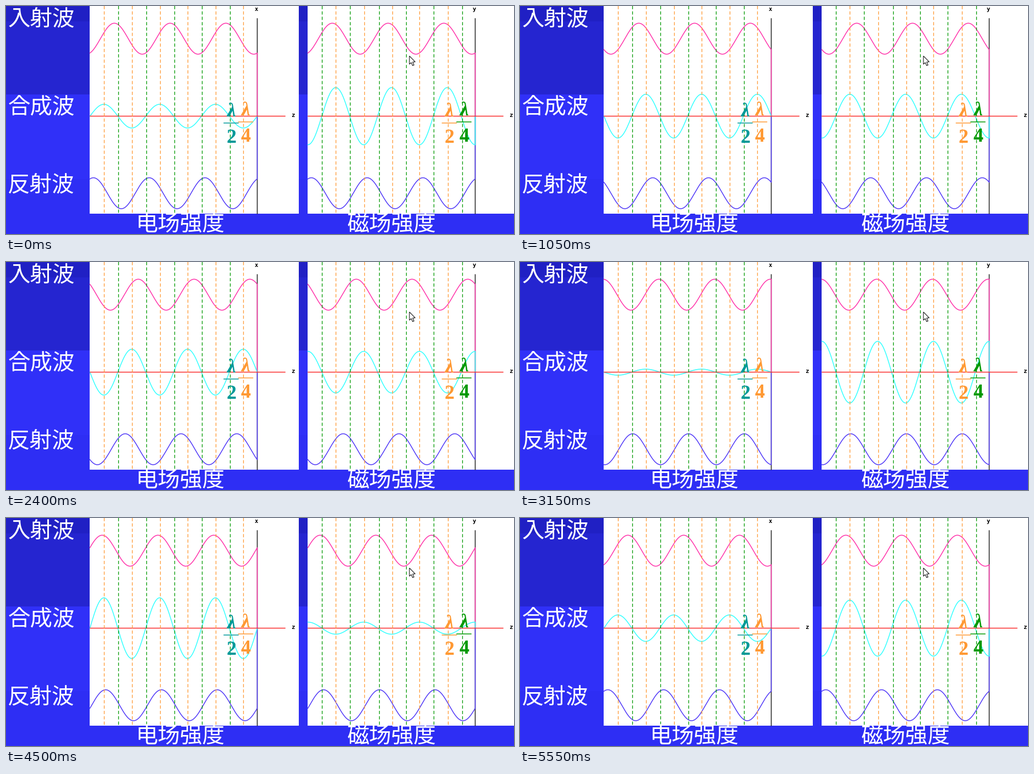
Recreate the animation shown at these times as a matplotlib script. Size 923 by 415 pixels, loop 5.85 s.

```python
import numpy as np
import matplotlib.pyplot as plt
from matplotlib.animation import FuncAnimation
from matplotlib.patches import Polygon, Rectangle

W, H, DPI = 923, 415, 64
PX = 72 / DPI                      # one pixel in points
TICK, TICKS = 150, 39

PINK, CYAN, VIOLET, RED = "#ff33aa", "#33ffff", "#5038f8", "#fa2a2a"
ORANGE, GREEN, TEAL = "#ff9933", "#009900", "#009999"

SPAN = 304                         # three wavelengths
K = 2 * np.pi * 3 / SPAN
AMP = 28.2
TOP, MID, LOW = 59.5, 200.5, 340.8
STEP = 2 * np.pi / 128             # smallest phase advance

fig = plt.figure(figsize=(W / DPI, H / DPI), dpi=DPI)
ax = fig.add_axes([0, 0, 1, 1])
ax.set_xlim(0, W)
ax.set_ylim(H, 0)
ax.axis("off")


def rect(x, y, w, h, color):
    ax.add_patch(Rectangle((x, y), w, h, color=color, lw=0, zorder=0))


def line(xs, ys, color, width, z, **kw):
    return ax.plot(xs, ys, color=color, lw=width * PX, zorder=z,
                   snap=False, **kw)[0]


def text(x, y, s, size, color, font, **kw):
    return ax.text(x, y, s, size=size * PX, color=color, family=font,
                   ha="center", va="baseline", zorder=8, **kw)


def caption(x, y, s):
    text(x, y, s, 40.5, "white", "Noto Sans CJK JP")


def axis_label(x, y, s):
    text(x, y, s, 10.5, "black", "DejaVu Sans Mono", weight="bold")


def fraction(x, y, digit, color):
    text(x, y - 12, "λ", 36, color, "Liberation Serif",
         style="italic", weight="bold")
    line([x - 13, x + 13], [y, y], color, 1.5, 7)
    text(x, y + 36, digit, 36, color, "Liberation Serif", weight="bold")


def dashes(xs, color):
    for x in xs:
        line([x + 0.5] * 2, [0, 378], color, 1.3, 5,
             dashes=(4.5, 3), dash_capstyle="butt")


class Panel:
    def __init__(self, left, sign, axis_name):
        self.sign = sign
        self.u = np.linspace(0, SPAN, 153)
        self.x = left - 0.5 + self.u
        end = self.x[-1]
        line([end, end], [23, 378], "#202020", 1.5, 1)
        line([left, left + 354], [MID, MID], RED, 1.5, 4)
        axis_label(end - 1.5, 9, axis_name)
        axis_label(left + 368.5, 202, "z")
        self.incident = line([], [], PINK, 1.5, 2)
        self.reflected = line([], [], VIOLET, 1.5, 2)
        self.total = line([], [], CYAN, 1.5, 3)

    def show(self, curve, base, wave):
        # every curve ends with a drop to the horizontal axis
        curve.set_data(np.append(self.x, self.x[-1]),
                       np.append(base - wave, MID))

    def update(self, phase):
        inc = -AMP * np.cos(K * self.u - phase)
        ref = AMP * np.cos(K * self.u + phase)
        self.show(self.incident, TOP, inc)
        self.show(self.reflected, LOW, ref)
        self.show(self.total, MID, inc + self.sign * ref)


rect(0, 0, W, 28, "#2020c4")
rect(0, 28, W, 133, "#2525d0")
rect(0, 161, W, 154, "#3030f8")
rect(0, 315, W, 100, "#2e2ef4")
rect(152, 0, 380, 378, "white")
rect(548, 0, W - 548, 378, "white")

for row, name in zip((35, 195, 337), ("入射波", "合成波", "反射波")):
    caption(64, row, name)
caption(316.5, 409, "电场强度")
caption(701, 409, "磁场强度")

panels = [Panel(153, 1, "x"), Panel(549, -1, "y")]

dashes((178, 229, 280, 330, 381, 431), ORANGE)
dashes((204, 255, 306, 356, 407), GREEN)
dashes((574, 625, 678, 727, 777, 829), GREEN)
dashes((599, 651, 702, 751, 803), ORANGE)

fraction(409, 213, "2", TEAL)
fraction(435.5, 211, "4", ORANGE)
fraction(805.5, 213, "2", ORANGE)
fraction(832, 211, "4", GREEN)

pointer = [(733, 91), (733, 106), (736.3, 103), (738.8, 108.5),
           (741.3, 107.5), (738.9, 102), (743.5, 101.7)]
ax.add_patch(Polygon(pointer, fc="white", ec="black", lw=PX, zorder=9))


def advance(pose):
    """Phase steps made by a pose; the pace drifts a little around five."""
    return round(np.interp(pose, [0, 3, 7, 11, 17, 23, 25],
                           [0, 14, 35, 55, 85, 116, 127]))


def draw(tick):
    # poses are held for one and two ticks in turn
    pose = 2 * (tick // 3) + (tick % 3 > 0)
    phase = (advance(pose) - 8) * STEP
    for panel in panels:
        panel.update(phase)


anim = FuncAnimation(fig, draw, frames=TICKS, interval=TICK,
                     repeat=True, repeat_delay=0)
plt.show()
```
